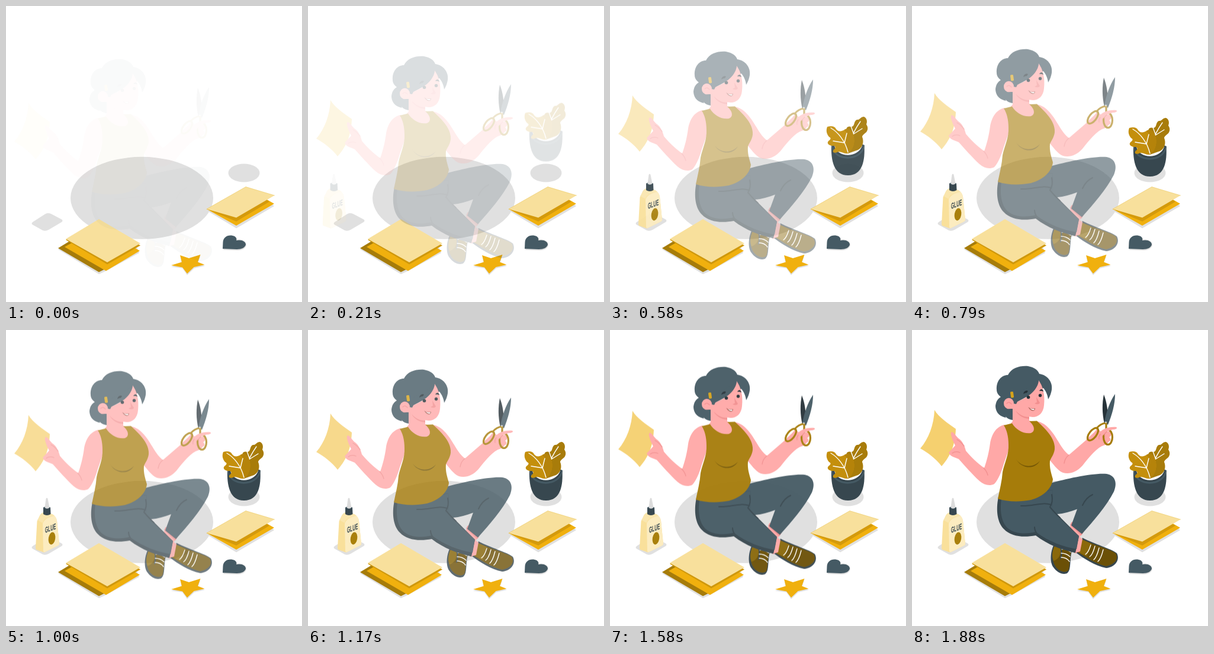
Write an HTML page that moves like this. It is 500 px wide and 500 px high and loops after 1.93 s.

```html
<!DOCTYPE html>
<html lang="en">
<head>
<meta charset="utf-8">
<title>Paper craft</title>
<style>
  html, body { margin: 0; width: 100%; height: 100%; overflow: hidden; background: #fff; }
  svg { display: block; width: 100%; height: 100%; }
  .woman, .plant, .glue { animation: 1930ms infinite both; }
  .woman { animation-name: rise; animation-timing-function: cubic-bezier(.108, .18, .618, 1); }
  .plant { --from: translateY(-30px); animation-name: enter; }
  .glue { --from: translateX(-30px); animation-name: enter; }
  @keyframes rise {
    from { transform: translateY(29px); opacity: .034; }
    to { transform: none; opacity: 1; }
  }
  @keyframes enter {
    0%, 8.3% { transform: var(--from); opacity: 0; animation-timing-function: ease-out; }
    35.8%, 100% { transform: translate(0); opacity: 1; }
  }
  .grey { fill: #e0e0e0; }
  .slate { fill: #455a64; }
  .dark { fill: #37474f; }
  .ink { fill: #263238; }
  .skin { fill: #ffa8a7; }
  .blush { fill: #f28f8f; }
  .gold { fill: #f0b00e; }
  .ochre { fill: #a67c0a; }
  .brown { fill: #6b5006; }
  .pale { fill: #f8e09c; }
  .line { fill: none; stroke-linecap: round; stroke-linejoin: round; }
  .white { stroke: #fff; stroke-width: 1.4; }
  .crease { stroke: #f28f8f; stroke-width: 1.3; }
  .fold { stroke: #37474f; stroke-width: 2; }
</style>
</head>
<body>
<svg viewBox="0 0 500 500">
  <!-- floor shadows -->
  <g class="grey">
    <ellipse cx="229.5" cy="324.3" rx="120.5" ry="69.5"/>
    <ellipse cx="402" cy="282" rx="26.5" ry="15.4"/>
    <path d="M45 365L66 351.5Q71 349 76 351L94 360.500Q97 362.500 94 365L72 378Q67 381 62 379L45 369.500Q42 367.500 45 365Z"/>
  </g>

  <!-- paper stacks -->
  <path class="grey" d="M88 411L157 453L168 448L225 417L220 405L107 399Z"/>
  <path class="ochre" d="M88 409L107 397.500L176 440L157 449.500Z"/>
  <path class="gold" d="M99 407L157 374L226 413.500L169 447.500Z"/>
  <path d="M101 395L157 363L227 404.500L171 436.500Z" fill="#cf980c"/>
  <path class="pale" d="M157 360L227 401L171 433L101 393.500Z"/>

  <path class="grey" d="M340 346L389 375.500L453 338L440 327Z"/>
  <path class="gold" d="M339 343L389 371L453 334L439 326Z"/>
  <path d="M339 343L389 364L445 330.500L438 326Z" fill="#d49a0c"/>
  <path class="pale" d="M405 305.500L453.500 320L389 357.500L339 343Z"/>
  <path class="line" d="M339 343L405 305.500L453.500 320" stroke="#edca68" stroke-width=".7"/>

  <!-- cut-outs -->
  <path class="grey" d="M367 412L368 400C368 391 376 387 384 389C389 391 391 393 391 395C399 393 406 398 406 404C405 409 399 413 391 413Z"/>
  <path class="slate" d="M366 410L366.500 399C367 391 374 386 383 388C388 389 390 392 389 396C398 394 405 398 405 403C404 408 398 411 390 411Z"/>
  <path class="grey" d="M295 424L309 429L328 423L324 435L336 439L318 443L306 454.500L298 443L279 440.500L296 435Z"/>
  <path class="gold" d="M294 421L309 426L328.500 420L324 432.500L335.500 437L317.500 441L306 452L298 441.500L279 438L297 432.500Z"/>

  <g class="glue">
    <path d="M55 318Q58 310 63 308L75 310Q84 313 86 322L90 361Q90 363 88 364L66 375Q64 376 62 375L51 371Q50 370 50 368L52.500 323Z" fill="#f9e09b"/>
    <path d="M62 327Q64 321 70 318L80 313Q85 315 86 322L90 361Q90 363 88 364L66 375Q63 376 63 373Z" fill="#fcecc0"/>
    <path d="M55 318Q58 310 63 308L75 310Q80 311 82 314L69 318Q63 320 62 326L53 321Z" fill="#fae6ae"/>
    <path class="dark" d="M63 300Q69 296 75 300L75.500 311Q69 315 63 311Z"/>
    <path class="slate" d="M63 300Q69 296 75 300Q69 304 63 300Z"/>
    <path d="M65.500 300L67.500 285Q69 282 70.500 285L73.500 300Q69 303.500 65.500 300Z" fill="#dcdcdc"/>
    <text transform="matrix(.47 -.18 0 1 66 343)" font-family="'Liberation Sans', Arial, sans-serif" font-weight="700" font-size="14" fill="#37474f">GLUE</text>
    <ellipse cx="77.500" cy="352" rx="5.700" ry="10.600" transform="rotate(9 77.500 352)" fill="#a9800c"/>
  </g>

  <g class="plant">
    <path class="dark" d="M374 237C373 263 378 288 402 288C427 288 431 262 429.500 237Z"/>
    <path class="slate" d="M374 238C376 267 428 267 430 237L425 235L379 235Z"/>
    <path class="dark" d="M376 238C379 263 425 263 428 237Z"/>
    <path d="M379 238C384 259 419 259 426 238Z" fill="#fafafa"/>
    <path d="M429 189C434 191 435 197 433 202C436 206 436 211 433 215C430 218 426 220 426 223C429 230 428 240 419 245L402 251L400 213C398 207 402 204 408 206C414 205 411 197 417 194C422 195 423 189 429 189Z" fill="#a87c0a"/>
    <path class="line white" d="M423 197C416 207 410 217 406 230M426 209L410 219M407 205L411 216"/>
    <path d="M367 206C374 204 380 205 382 210C386 215 391 214 396 211C404 206 411 214 412 224C414 234 410 245 402 251C396 252 391 248 386 248C381 251 375 250 377 246C381 242 382 240 378 238C371 239 365 234 369 230C373 227 374 225 370 223C365 217 365 211 367 206Z" fill="#c48f0c"/>
    <path d="M396 211C404 206 411 214 412 224C414 234 410 245 402 251C401 238 396 233 400 216Z" fill="#b5830a"/>
    <path class="line white" d="M373 208C385 215 397 229 402 249M377 230L396 233M400 217L396 233"/>
  </g>

  <g class="woman">
    <!-- far leg -->
    <path class="skin" d="M270 324L290 341L283 350L288 354L285 377L274 377L276 350L265 337Z"/>
    <path class="blush" d="M270 324L290 341L286 347L267 329Z"/>
    <path class="slate" d="M232 259C262 251 306 241 329 243C344 246 347 259 341 273C329 297 306 323 287 344.500L269 330L279 302.500C268 307 256 310 245 311L218 300Z"/>

    <!-- shoes -->
    <path class="dark" d="M241 360C234 372 232 392 239 401C245 410 257 415 263 410C269 404 266 389 270 373Z"/>
    <path class="brown" d="M242 362C236 374 236 390 242 399C248 408 259 411 264 406C267 400 265 389 269 374Z"/>
    <path d="M242 362C236 374 236 383 239 390C248 387 252 380 251 366Z" fill="#8a680a"/>
    <path class="line fold" d="M251 366Q254 376 251 386"/>
    <path class="line white" d="M253 370Q262 370 268 375M252 377Q261 377 267 383M252 384Q261 384 266 391"/>

    <path class="dark" d="M288 351C309 362 336 369 346 377C352 388 343 401 328 402C309 398 290 386 277 376Z"/>
    <path class="brown" d="M288 354C308 363 334 370 344 377C350 387 342 396 328 399C311 395 293 384 280 375Z"/>
    <path d="M288 354L303 361L295 382L280 375Z" fill="#8a680a"/>
    <path class="line white" d="M293 379Q298 376 302 363M300 383Q305 380 309 365M307 388Q312 384 316 368M314 391Q319 387 323 371"/>
    <path class="skin" d="M280 347L288 353L284 374L274 377Z"/>

    <!-- near leg -->
    <path class="dark" d="M146 282C141 306 145 326 155 336C167 349 188 351 209 347C230 363 252 371 276 376.500L282 348L236 302L238 270Z"/>
    <path class="slate" d="M151 285C148 306 151 325 162 335C174 345 194 345 209 341C232 358 255 366 278 370L282 348C266 333 249 319 236 302L238 270Z"/>
    <path class="line fold" d="M184 297C205 298 218 290 235 295M236 278C238 287 237 293 233 299C239 306 244 312 250 317M207 333Q207 338 211 344M288 296Q294 283 305 278"/>

    <!-- sheet and left arm -->
    <path d="M38 135C45 147 60 157 74 167C73 191 67 211 50 230C40 217 28 208 14 200C28 184 37 160 38 135Z" fill="#f5d06f"/>
    <path class="skin" d="M156 160C141 164 135 176 132 191C130 207 126 222 122 233C112 226 99 214 91 204C89 196 86 189 80 184C74 180 72 173 67 172C64 175 67 180 69 187L73 195L62 207C64 214 73 215 79 218C88 228 102 244 114 255C122 262 131 264 139 260C146 253 152 237 155 226L166 195L166 165Z"/>
    <path class="line crease" d="M121 233C125 237 127 241 128 245M76 185Q83 189 88 196M68 208Q74 204 81 207"/>

    <!-- right arm -->
    <path class="skin" d="M207 154C226 154 238 173 247 188C254 200 259 206 265 211L294 186C300 180 306 173 315 168L324 176C336 177 336 190 326 194C312 198 300 214 288 229C278 240 266 244 255 241C245 237 238 225 231 218Z"/>
    <path class="line crease" d="M265 211C259 216 258 220 257 225"/>

    <!-- hand and scissors -->
    <path class="skin" d="M298 185C304 181 306 173 312 168C316 166 317 169 313 175L319 174L333 171C338 174 338 178 333 181C337 184 336 188 331 189C328 195 318 197 308 197Z"/>
    <path class="ink" d="M324 109C329 121 332 139 330 157L325 158C321 141 321 124 324 109Z"/>
    <path class="slate" d="M343 108C343 125 338 143 331 160L325 156C328 138 334 121 343 108Z"/>
    <g class="line" stroke="#a67c0a" stroke-width="3.200">
      <ellipse cx="305.500" cy="176" rx="12.500" ry="6" transform="rotate(-52 305.500 176)"/>
      <ellipse cx="331" cy="181" rx="7.500" ry="12.500"/>
      <path d="M312 166Q318 158 328 157L328 171"/>
    </g>
    <path class="skin" d="M315 177C319 167 332 163 345 164C348 166 344 168 339 168L330 171Q322 178 318 183Z"/>
    <path class="line crease" d="M318 176Q315 180 316 184M329 172Q325 174 325 178"/>
    <circle cx="327.500" cy="156" r="1.400" fill="#d8d8d8"/>

    <!-- neck and top -->
    <path class="skin" d="M169 122L198 142L198 153L211 157L209 179L177 178L166 159L170 154Z"/>
    <path class="blush" d="M175 136C182 144 190 147 198 147L198 150C188 149 180 145 175 136Z"/>
    <path class="ochre" d="M155 161L169 157.500C176 169 189 176 201 174C209 171 207 161 198 154L211 153.500C223 165 240 180 241 197C242 208 235 215 233 221C232 233 235 241 238 252C236 268 222 281 201 287C181 291 160 290 145 285C148 270 152 255 153 240C156 225 164 210 163 193C163 180 160 168 155 161Z"/>
    <path d="M176 218C184 232 205 234 216 221C207 237 184 234 176 218Z" fill="#735606"/>

    <!-- head -->
    <path class="slate" d="M143 101C142 86 151 76 162 76C168 64 182 60 196 61C207 63 213 68 215 74C229 76 238 88 236 101C235 107 233 112 230 117C229 109 226 103 222 98L170 125L170 152Q162 151 158 146Q159 149 158 148C145 145 141 136 141 128C142 120 145 116 150 113C146 110 143 106 143 101Z"/>
    <path class="skin" d="M214 85C221 95 225 108 223 127C222 140 214 147 204 147C187 146 174 139 170 127L177 121C196 114 210 104 214 85Z"/>
    <path class="slate" d="M170 112L214 86C211 105 193 113 178 121L176 125L170 124Z"/>
    <ellipse class="skin" cx="163.500" cy="124" rx="8.500" ry="9.300"/>
    <path class="skin" d="M165 117L170 119L171 133L164 133Z"/>
    <path class="line crease" d="M160 124Q164 120 168 125"/>
    <rect x="166.500" y="104" width="5" height="10.500" rx="1.500" transform="rotate(-8 169 109)" fill="#d6a31a"/>
    <g class="ink">
      <circle cx="196.500" cy="113.500" r="2.800"/>
      <circle cx="216.500" cy="110.500" r="2.700"/>
      <path d="M188 108C189 103 193 101 196 103L194 106Q191 106 188 108Z"/>
      <path d="M215 103C217 99 221 99 222 104Q218 102 215 103Z"/>
    </g>
    <path class="blush" d="M210 113L216 123Q214 127 207 124L211 122Z"/>
    <path d="M196 130C200 133 204 133 208 132C208 137 203 138 199 134Z" fill="#a95f56"/>
    <path d="M199 132Q203 134 207 133L206 135Q202 136 199 132Z" fill="#fff"/>
  </g>
</svg>
</body>
</html>
```
